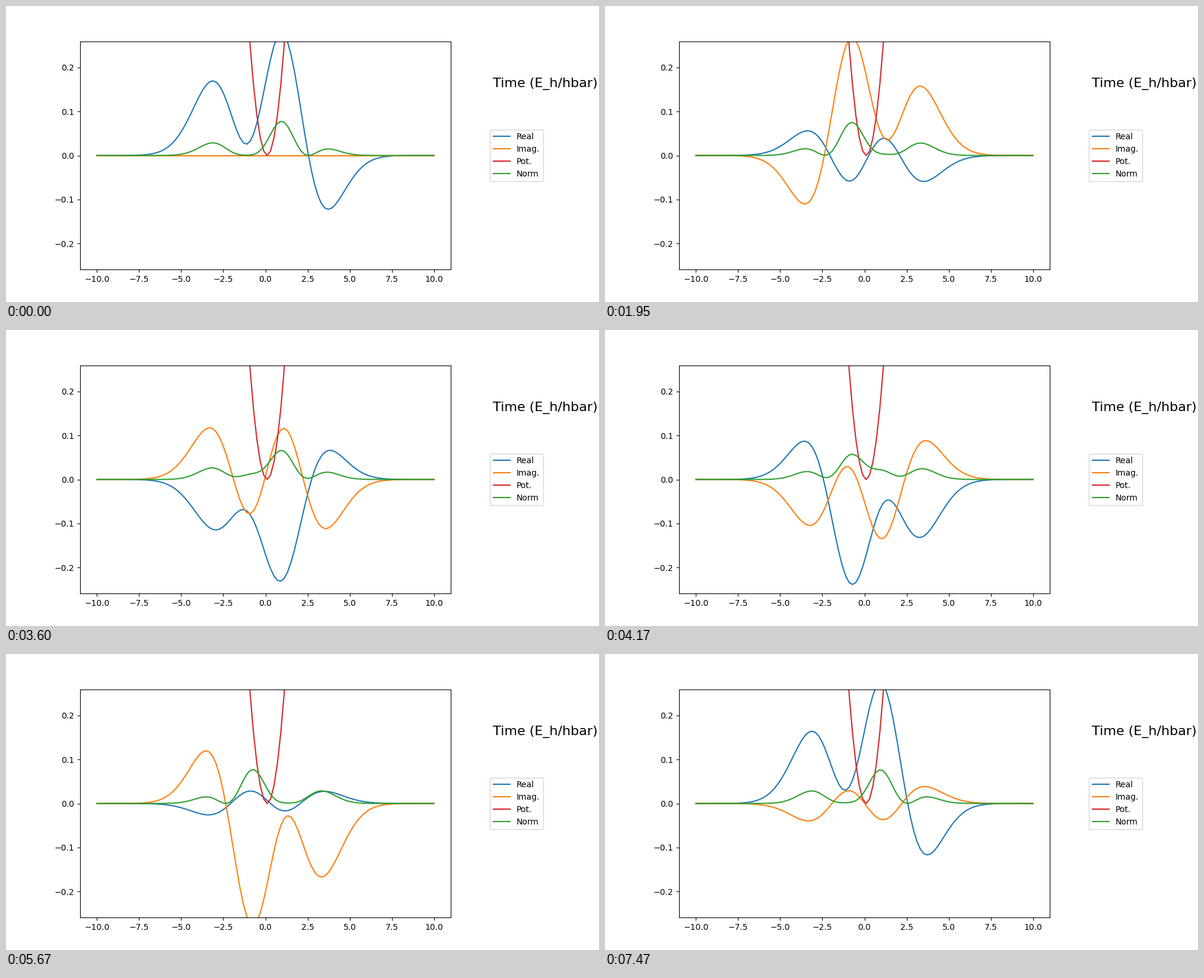
Animation of 1000x500 px, one loop 7.5 s. Source, as a matplotlib script:

```python
import numpy as np
import matplotlib.pyplot as plt
from matplotlib.animation import FuncAnimation

FRAMES = 250
POINTS = 100
DX = 0.1

# Harmonic oscillator on a finite-difference grid (hbar = m = 1).
x = (np.arange(POINTS) - POINTS // 2) * DX
pot = x**2
hop = np.full(POINTS - 1, -0.5 / DX**2)
ham = np.diag(pot + 1 / DX**2) + np.diag(hop, 1) + np.diag(hop, -1)
energy, states = np.linalg.eigh(ham)

ground = states[:, 0] * np.sign(states[:, 0].sum())
third = states[:, 3] * np.sign(states[34, 3])
ymax = ground.max()


def wave(k):
    """Equal mix of two eigenstates; one loop is one ground-state period."""
    phase = 2 * np.pi * k / FRAMES
    turn = np.exp(1j * phase)
    fast = np.exp(1j * phase * energy[3] / energy[0])
    return (ground * turn + third * fast) / np.sqrt(2)


fig, ax = plt.subplots(figsize=(10, 5), dpi=100)
fig.subplots_adjust(left=0.125, right=0.75, bottom=0.11, top=0.88)

grid = np.linspace(-10, 10, POINTS)
zero = np.zeros(POINTS)
real, = ax.plot(grid, zero, color="C0", label="Real")
imag, = ax.plot(grid, zero, color="C1", label="Imag.")
ax.plot(grid, pot, color="C3", label="Pot.")
norm, = ax.plot(grid, zero, color="C2", label="Norm")
ax.set_ylim(-ymax, ymax)

ax.text(13.5, 0.6 * ymax, "Time (E_h/hbar)", fontsize=16)
ax.legend(loc="center left", bbox_to_anchor=(0.8163, 0.495),
          bbox_transform=fig.transFigure, borderaxespad=0)


def update(k):
    psi = wave(k)
    real.set_ydata(psi.real)
    imag.set_ydata(psi.imag)
    norm.set_ydata(np.abs(psi)**2)
    return real, imag, norm


anim = FuncAnimation(fig, update, frames=FRAMES, interval=30,
                     init_func=lambda: update(0), repeat=True,
                     repeat_delay=0, blit=False)
plt.show()
```
